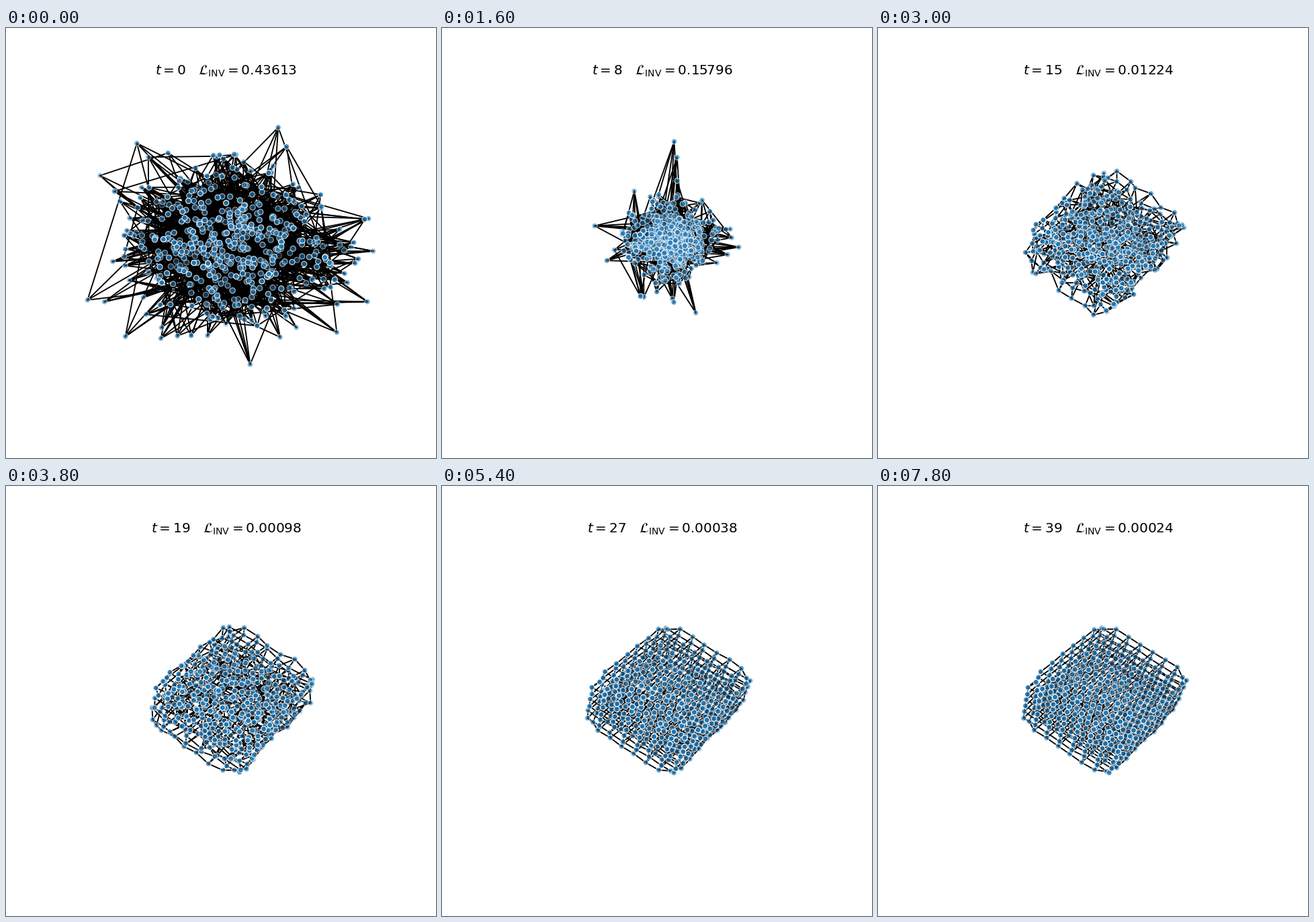
A matplotlib script for the animation above (8000 ms loop, 640 by 640 pixels).

```python
import numpy as np
import matplotlib.pyplot as plt
from matplotlib.animation import FuncAnimation
from matplotlib.collections import LineCollection

SIZE = 640
RIGHT = 574          # drawing is clipped at this x
N = 8                # nodes per side of the cube
STEPS = 40
BLUE = (31 / 255, 119 / 255, 180 / 255)
CENTER = np.array([338.0, 318.0, 0.0])

rng = np.random.default_rng(12)

# lattice and its edges
grid = np.array(list(np.ndindex(N, N, N)))
ids = np.arange(N ** 3).reshape(N, N, N)
edges = np.concatenate([
    np.stack([np.delete(ids, -1, ax).ravel(), np.delete(ids, 0, ax).ravel()], 1)
    for ax in range(3)])


def project(points):
    """Perspective view of the unit cube: x, y in pixels and depth."""
    axes = np.array([[125.7, 77.6], [-101.1, 78.6], [-20.3, 70.8]])
    depth = points @ np.array([-0.018, -0.097, 0.093])
    xy = np.array([336, 202]) + points @ axes / (1 + depth)[:, None]
    return np.column_stack([xy, 600 * depth])


def limit(offset, rx, ry):
    """Pull stray nodes back onto the ellipse with radii rx and ry."""
    reach = np.hypot(offset[:, 0] / rx, offset[:, 1] / ry)
    return offset / np.maximum(1, reach)[:, None]


def normal(*scale):
    return rng.normal(size=(N ** 3, 3)) * scale


def stray(scale):
    """Heavy-tailed noise: most nodes stay close, a few fly far."""
    return rng.standard_t(3, size=(N ** 3, 3)) * scale


# settled shape: a cube whose eight corners are drawn in
unit = grid / (N - 1) - 0.5
corner = np.all(np.abs(unit) == 0.5, axis=1)
cube = project(unit * np.where(corner, 0.915, 1)[:, None] + 0.5)
radius = np.linalg.norm(unit, axis=1, keepdims=True) / np.sqrt(0.75)
shape = cube - CENTER
pointed = shape * np.sqrt(radius)

# poses on the way from a scattered cloud to the cube
cloud = CENTER + [-8, 2, 0] + limit(normal(80, 60, 70), 236, 182)
blob = CENTER + limit(0.2 * shape + stray(12), 95, 81)
opening = CENTER + limit(0.5 * pointed + stray(13), 150, 168)
star = CENTER + limit(0.9 * pointed + stray(11), 156, 120)
jitter = normal(1, 1, 1)
drift = normal(0.5, 0.5, 0.5)

# time, positions, easing power of the way to the next pose
POSES = [
    (0, cloud, 1.4),
    (4, blob, 1),
    (7, opening, 1),
    (12, star, 2),
    (19, cube + 3.2 * jitter, 1.5),
    (23, cube + 1.8 * jitter, 1.5),
    (31, cube + 0.6 * jitter, 1),
    (39, cube + 0.4 * jitter + drift, 1),
]

LOSS = {0: 0.43613, 4: 0.30683, 12: 0.08132, 19: 0.00098,
        23: 0.00047, 31: 0.00030, 39: 0.00024}


def pose_at(t):
    for (t0, p0, power), (t1, p1, _) in zip(POSES, POSES[1:]):
        if t <= t1:
            s = 1 - (1 - (t - t0) / (t1 - t0)) ** power
            return p0 + (p1 - p0) * s


fig = plt.figure(figsize=(6.4, 6.4), dpi=100, facecolor="white")
ax = fig.add_axes([0, 0, RIGHT / SIZE, 1])
ax.set(xlim=(0, RIGHT), ylim=(SIZE, 0))
ax.axis("off")

lines = LineCollection([], colors="black", linewidths=1.35, capstyle="projecting", zorder=1)
ax.add_collection(lines)
dots = ax.scatter(cube[:, 0], cube[:, 1], s=34, linewidths=0.9, zorder=2)
title = fig.text(328 / SIZE, 570 / SIZE, "", ha="center", va="baseline", fontsize=14.4)


def draw(t):
    pos = pose_at(t)
    xy, depth = pos[:, :2] + 0.5, pos[:, 2]
    lines.set_segments(xy[edges])

    # far nodes first, fading with depth
    order = np.argsort(-depth)
    alpha = 1 - 0.7 * (depth - depth.min()) / np.ptp(depth)
    face = np.column_stack([np.tile(BLUE, (len(pos), 1)), alpha[order]])
    rim = face.copy()
    rim[:, :3] = 1
    dots.set_offsets(xy[order])
    dots.set_facecolors(face)
    dots.set_edgecolors(rim)

    loss = np.exp(np.interp(t, list(LOSS), np.log(list(LOSS.values()))))
    title.set_text(rf"$t = {t} \quad \mathcal{{L}}_{{\mathrm{{INV}}}} = {loss:.5f}$")
    return lines, dots, title


anim = FuncAnimation(fig, draw, frames=STEPS, interval=200, repeat=True, repeat_delay=0)
plt.show()
```
